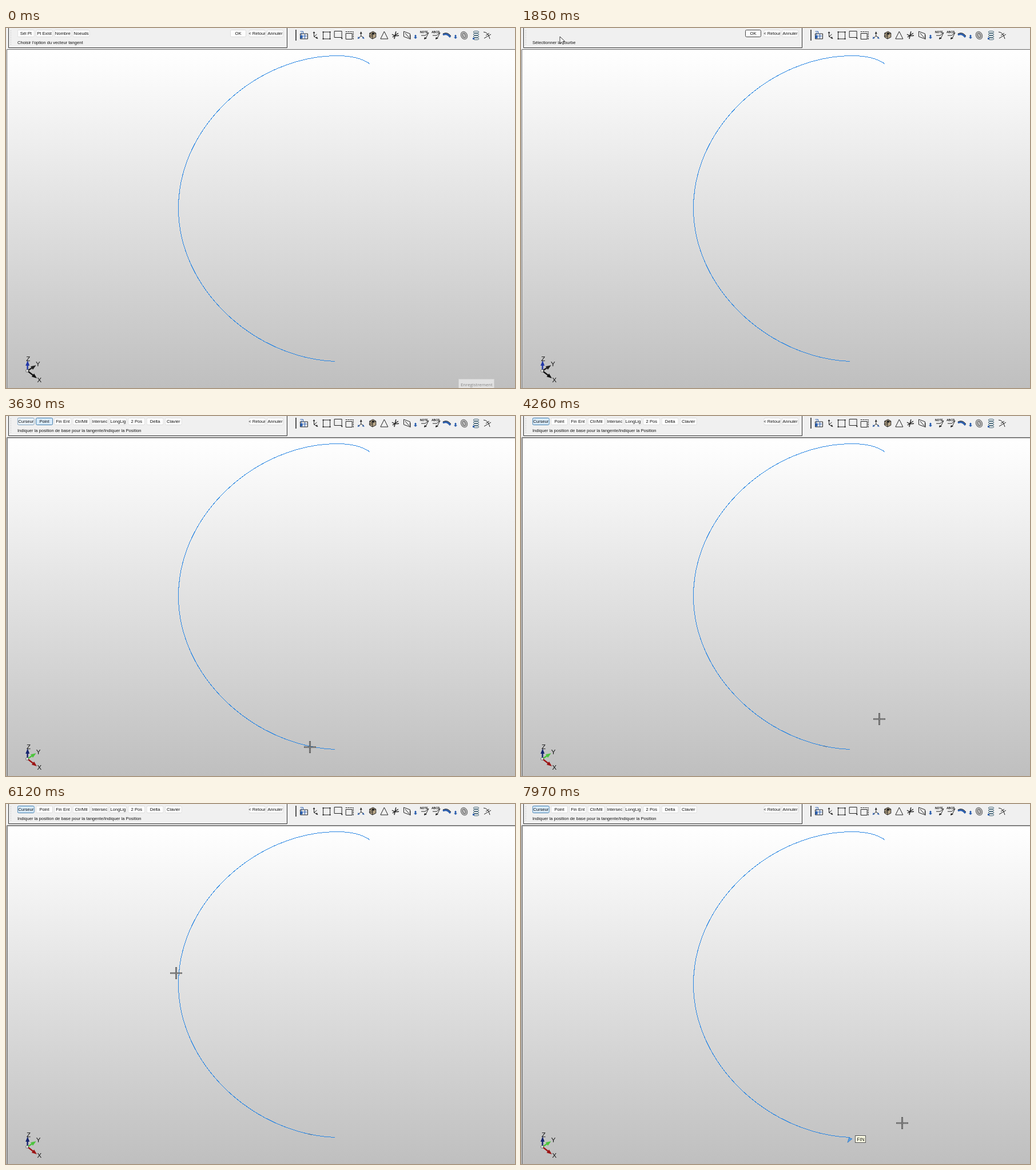
These frames come from a looping animation (890 px wide and 629 px high, 8000 ms). An HTML page:

```html
<!DOCTYPE html>
<html lang="fr">
<head>
<meta charset="utf-8">
<title>Vecteur tangent</title>
<style>
html, body { margin: 0; width: 100%; height: 100%; overflow: hidden; background: #f0f0f0; }
svg { display: block; }
text { font-family: "Liberation Sans", Arial, sans-serif; font-size: 7.6px; fill: #111; }
.btn rect { fill: #fdfdfd; stroke: #dcdcdc; }
.btn text { text-anchor: middle; }
.btn.focus rect { stroke: #444; }
.btn.soft rect { fill: #eaf3fb; stroke: #7d9fba; }
.btn.hot rect { fill: #d7eafa; stroke: #3f7cab; }
.ico { fill: none; stroke: #222; }
.ico text { font-size: 5px; font-weight: bold; fill: #111; stroke: none; }
.solid { fill: #222; stroke: none; }
.blue { stroke: #2c5fae; }
.bluefill { fill: #2c5fae; stroke: none; }
.axes text { font-size: 11.5px; }
#curve { fill: none; stroke: #2a86e2; shape-rendering: crispEdges; }
#curve.pick { stroke: #10bd82; }
</style>
</head>
<body>
<svg width="890" height="629" viewBox="0 0 890 629">
  <linearGradient id="sky" x2="0" y2="1">
    <stop stop-color="#fff"/>
    <stop offset=".04" stop-color="#fdfdfd"/>
    <stop offset="1" stop-color="#bfbfbf"/>
  </linearGradient>

  <rect width="890" height="629" fill="#f0f0f0"/>
  <path d="M4.5 0V34.5H491.5V0" fill="none" stroke="#333"/>
  <path d="M8.5 4V31" stroke="#bbb" stroke-dasharray="1 2"/>
  <rect x="1" y="37" width="889" height="592" fill="url(#sky)"/>
  <path d="M1.5 629V37.5H890" fill="none" stroke="#666"/>
  <path id="frame" d="M2.5 629V38.5H890" fill="none" stroke="#999"/>

  <g id="menus"></g>
  <text id="prompt" x="20" y="28.4"></text>
  <g class="ico" id="icons"></g>

  <path id="curve" d="M636 62.5C621 52 600 48.5 579 48.5C441 48.5 301.5 168.5 301.5 315C301.5 455 433 576.5 575 582.5"/>
  <path id="trace" d="M528 576.5L535 578.3" stroke="#234" stroke-width=".8" opacity=".5"/>
  <path id="tip" d="M571 591.5L579 585L573.5 583Z" fill="#5a9fe0" stroke="#2a76c8" stroke-width=".7" stroke-linejoin="round"/>
  <path id="cross" d="M569 576L582 589M582 576L569 589" stroke="#222"/>

  <g class="axes" id="axes"></g>

  <g id="record">
    <rect x="791.5" y="613.5" width="62" height="17" fill="#e2e2e2" stroke="#cfcfcf"/>
    <text x="795" y="625.5" style="font-family:'Open Sans',sans-serif;font-size:7.8px;fill:#858585">Enregistrement</text>
  </g>
  <g id="label">
    <rect x=".5" y=".5" width="18" height="12" fill="#ffffe6" stroke="#555"/>
    <text x="3.3" y="9.8" style="font-size:8.3px">FIN</text>
  </g>
  <path id="arrow" d="M0 0V12L3 9.5L5 13.5L7 12.5L5 8.7H9Z" fill="#fff" stroke="#222" stroke-width=".9"/>
  <g id="plus">
    <path d="M-10.5 0H10.5M0 -10.5V10.5" stroke="#222" stroke-width="2.2"/>
    <path d="M-10 0H10M0 -10V10" stroke="#bbb" stroke-width=".7"/>
  </g>
</svg>
<script>
const LOOP = 8000, STEP = 77.4;
const $ = id => document.getElementById(id);
const show = (id, on) => { $(id).style.display = on ? '' : 'none'; };
const within = (t, a, b) => t >= a && t < b;
const place = (id, x, y) => $(id).setAttribute('transform', `translate(${x} ${y})`);

// Prompt bar
const button = (label, x, w, id = '') =>
  `<svg class="btn" id="${id}" x="${x - w / 2}" y="3" width="${w}" height="13">
   <rect x=".5" y=".5" width="${w - 1}" height="12" rx="2"/><text x="${w / 2}" y="9.3">${label}</text></svg>`;
const row = (id, labels, ids) =>
  `<g id="${id}">${labels.map((s, i) => button(s, 34.8 + i * 32.25, 30, ids[i])).join('')}</g>`;

$('menus').innerHTML =
  row('options', ['Sél Pt', 'Pt Exist', 'Nombre', 'Noeuds'], ['select', 'exist']) +
  row('modes', ['Curseur', 'Point', 'Fin Ent', 'Ctr/Mil', 'Intersec', 'LongLig', '2 Pos', 'Delta', 'Clavier'], ['cursor', 'point']) +
  button('OK', 406, 28, 'ok') + button('&lt; Retour', 439, 29) + button('Annuler', 470.5, 29);

// Tool icons, each drawn around its own centre, 20 px apart
const path = (d, cls = '') => `<path class="${cls}" d="${d}"/>`;
const dots = [-6, 6].map(x => [-6, 6].map(y => path(`M${x - 1} ${y - 1}h2v2h-2z`, 'solid')).join('')).join('');
const coils = [-6, -2, 2, 6].map(y => `<ellipse cy="${y}" rx="5" ry="1.7" stroke="#467"/>`).join('');
const ring = r => `<ellipse rx="${r}" ry="${r + 1.5}" stroke="#666" fill="#bbb" transform="rotate(-25)"/>`;
const note = word => path('M-6 0H1L7 -5L2 5H-1') + path('M-1 7L0 3L4 5Z', 'solid') + `<text x="-8" y="-4.5">${word}</text>`;
const drop = path('M-1 -1H1V3H3L0 6L-3 3H-1Z', 'bluefill') + path('M-2 1H2', 'blue');
const tools = [
  path('M-6 -3H7V6H-6Z') + path('M-6 -7H-1V-3M-4 -5V6M-6 1H6M2 -3V6', 'blue') + path('M-6 0h4v5h-4z', 'bluefill'),
  path('M-2 -6V2L4 5M-2 2L3 -2') + path('M-4 -4L-2 -7L0 -4ZM5 6L1 5L3 2Z', 'solid'),
  path('M-6 -6H6V6H-6Z') + dots,
  path('M-6.5 -7.5H6.5V3.500H-6.5Z') + path('M5 4h3l-1 3z', 'solid'),
  path('M-6.500 -3.500H4.500V6.500H-6.500Z') + '<path d="M-7 -6.500H6.500V7" stroke-dasharray="3 1"/>',
  path('M0 -5V1L-5 5M0 1L5 4') + path('M-2 -3L0 -7L2 -3Z', 'solid') + path('M-6 6L-5 2L-2 5ZM6 6L2 5L4 2Z', 'bluefill'),
  '<path d="M-5 -4L1 -7L6 -4V3L0 6L-5 3Z" fill="#b7a587"/>' + path('M-5 -4L0 -1L6 -4M0 -1V6M-6 1H0') + path('M-1 -5h4v3h-4z', 'solid'),
  path('M.5 -7L7 6H-6Z'),
  '<path d="M-6 -2Q0 2 6 0M1 -7L-2 6M-5 3L5 -4" stroke-width="1.4"/>',
  path('M-5.500 -7L5.500 -3V6L-5.500 2ZM-3 -4L4 4M6 -1V7')
];
const late = [
  [716, drop], [732, note('NOTE')], [752, note('ABCD')],
  [771, '<path class="blue" d="M-7 -1Q0 -5 6 3" stroke-width="3"/>' + path('M-7 -3Q1 -7 7 1')],
  [786, drop], [801, ring(5.5) + ring(2.5)], [822, coils + path('M-6 4h3v3h-3z', 'bluefill')],
  [842, path('M-7 -6Q1 -6 4 6M-6 5L6 -2M-3 0L3 -4')]
];
const tool = ([x, body]) => `<g transform="translate(${x} 13)">${body}</g>`;
$('icons').innerHTML = '<path d="M507 3V22" stroke="#555" stroke-width="2"/>' +
  [...tools.map((body, i) => [520.5 + i * 20.05, body]), ...late].map(tool).join('');

// Axis triad
const axis = (color, angle, len) =>
  `<g transform="translate(37.5 599) rotate(${angle})" fill="${color}" stroke="${color}">
   <path d="M0 0H${len - 7}" stroke-width="2.4"/><path d="M${len - 9} -3.5L${len} 0L${len - 9} 3.5Z" stroke="none"/></g>`;
const triad = (id, z, y, x, shift) => `<g id="${id}">
  ${axis(z, -89, 18)}${axis(y, -33, 18)}${axis(x, 38, 21)}
  <circle cx="37" cy="599" r="2.3" fill="#eee" stroke="#555" stroke-width=".8"/>
  <text x="${35.3 + shift}" y="581.5">Z</text><text x="${52 + shift}" y="${591.2 - shift}">Y</text>
  <text x="54.5" y="${619 - shift}">X</text></g>`;
$('axes').innerHTML = triad('idle', '#2238a8', '#222', '#111', 0) + triad('active', '#14246e', '#4cc43c', '#9c1414', .7);

// Where the pointer comes to rest: time, x, y
const stops = [
  [70, 806, 640], [690, 17, 14], [840, 66, 9], [1845, 68, 15], [2620, 531, 543], [2700, 542, 552],
  [2930, 531, 578], [4250, 626, 529], [4955, 625, 540], [5100, 600, 510], [5560, 33, 11],
  [6490, 557, 574], [6880, 580, 574], [7190, 582, 579], [7800, 582, 579], [7960, 666, 557]
];

// Each glide eases in and out; longer ways take more time
function pointer(t) {
  const i = stops.findIndex(s => s[0] > t);
  if (i < 1) return stops.at(i).slice(1);
  const [t0, x0, y0] = stops[i - 1], [t1, x1, y1] = stops[i];
  const time = Math.min(70 + 3 * Math.hypot(x1 - x0, y1 - y0), 770, t1 - t0);
  const p = Math.max(0, 1 - (t1 - t) / time);
  const k = p * p * (3 - 2 * p);
  return [Math.round(x0 + (x1 - x0) * k), Math.round(y0 + (y1 - y0) * k)];
}

const style = (id, name) => $(id).setAttribute('class', 'btn ' + name);

function draw(t) {
  // The screen is refreshed at a fixed step
  const held = t < 65 ? 0 : 70 + Math.floor((t - 65) / STEP) * STEP;
  const [x, y] = pointer(held);
  const base = t >= 3550;
  const plus = t > 5000 || (t > 1530 && y > 36);

  show('options', t < 1380);
  for (const id of ['modes', 'frame', 'active']) show(id, base);
  for (const id of ['ok', 'idle']) show(id, !base);
  show('record', t < 300);
  $('prompt').textContent = t < 1455 ? "Choisir l'option du vecteur tangent"
    : base ? 'Indiquer la position de base pour la tangente/Indiquer la Position'
    : 'Sélectionner la courbe';

  style('ok', t >= 1380 ? 'focus' : '');
  style('select', within(t, 685, 840) ? 'hot' : '');
  style('exist', t >= 920 ? 'hot' : '');
  style('cursor', t < 3700 ? 'soft' : 'hot');
  style('point', t < 3700 ? 'hot' : '');

  $('curve').setAttribute('class', within(t, 2860, 3550) || within(t, 6740, 7670) ? 'pick' : '');
  show('trace', within(t, 3700, 6740));
  show('cross', within(t, 6740, 7890));
  show('tip', t >= 7670);
  show('label', t >= 6740);
  const [lx, ly] = pointer(Math.min(held, 7800));
  place('label', lx + 2, ly);

  show('arrow', !plus);
  show('plus', plus);
  place('arrow', x, y);
  place('plus', x + .5, y + .5);
}

const start = performance.now();
function tick() {
  draw((performance.now() - start) % LOOP);
  requestAnimationFrame(tick);
}
tick();
</script>
</body>
</html>
```
